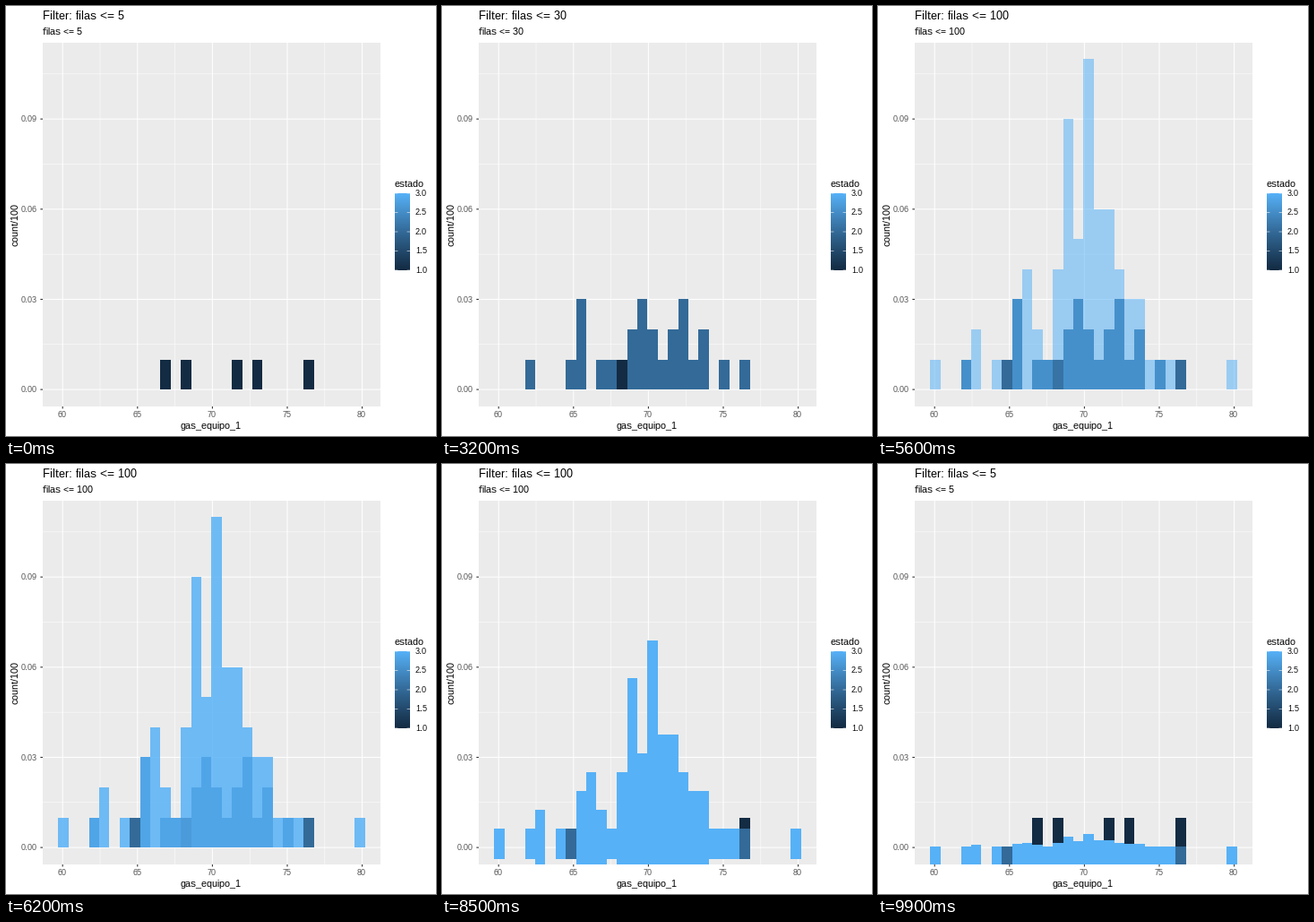
A matplotlib script that plays this animation: 480 by 480 pixels, repeating every 10000 ms.

```python
import numpy as np
import matplotlib.pyplot as plt
from matplotlib.animation import FuncAnimation
from matplotlib.patches import Rectangle

plt.rcParams.update({
    "font.family": "Liberation Sans",
    "text.hinting": "default",
    "text.hinting_factor": 1,
    "toolbar": "None",
})

SIZE, DPI = 480, 72
FRAMES, INTERVAL = 100, 100
LEFT, RIGHT, TOP, BOTTOM = 41, 418, 41, 447
BASE, UNIT = 428.1, 33.55          # zero line, height of one count
BINS, BIN_0, BIN_W = 30, 58.3, 11.41
FADE_2, FADE_3, DRIFT, SPAN = 10, 45, 76, 24
LOW, MID, HIGH = (np.array(c) / 255 for c in
                  ((19, 43, 67), (51, 106, 152), (86, 177, 247)))


def tally(*groups):
    """Histogram of the bin numbers in all groups."""
    return np.bincount(np.concatenate(groups).astype(int), minlength=BINS)


def bell_counts():
    """A bell of readings with some local clusters and strays."""
    b = np.arange(BINS)
    counts = np.rint(6.3 * np.exp(-((b - 15.7) / 3.9) ** 2)).astype(int)
    for spot, extra in ((4, 2), (8, 3), (9, 4), (13, 5), (15, 5)):
        counts[spot] += extra
    return counts + tally((0, 3, 6, 10, 12, 20, 22, 23, 29))


COUNTS = {
    1: tally((10, 12, 17, 19, 24)),
    2: tally((3,), np.setdiff1d(range(7, 25), (9, 12, 21, 23)),
             (13, 15, 17, 20), np.repeat((8, 14, 18), 2)),
    3: bell_counts(),
}


def x_px(v):
    return 230.4 + (v - 70) * 16.72


def y_px(v):
    return BASE - v * 100 * UNIT


def blue(t):
    """Colour scale from LOW through MID to HIGH."""
    t = np.asarray(t)[..., None]
    bend = 4 * t * (1 - t) * (MID - (LOW + HIGH) / 2)
    return LOW + (HIGH - LOW) * t + bend


fig = plt.figure(figsize=(SIZE / DPI, SIZE / DPI), dpi=DPI, facecolor="white")
ax = fig.add_axes([0, 0, 1, 1])
ax.set_axis_off()


def box(x0, y0, x1, y1, color, z):
    return ax.add_patch(Rectangle((x0, y0), x1 - x0, y1 - y0, facecolor=color,
                                  linewidth=0, snap=False, zorder=z))


def line(xs, ys, color, width, z):
    ax.plot(xs, ys, color=color, lw=width, solid_capstyle="butt",
            snap=False, zorder=z)


def label(x, y, s, size, color="black", **kw):
    return ax.text(x, y, s, fontsize=size, color=color, va="baseline", **kw)


# Panel, grid and axes
box(LEFT, TOP, RIGHT, BOTTOM, "#EBEBEB", 0)
for v in np.arange(60, 80.1, 2.5):
    x, major = x_px(v), v % 5 == 0
    line([x, x], [TOP, BOTTOM], "white", 1.07 if major else 0.53, 1 + major)
    if major:
        line([x, x], [BOTTOM, BOTTOM + 2.5], "#333333", 1.07, 1)
        label(x - 0.5, 459, f"{v:.0f}", 8.8, "#4D4D4D", ha="center")
for i in range(8):
    v, major = i * 0.015, i % 2 == 0
    y = y_px(v)
    line([LEFT, RIGHT], [y, y], "white", 1.07 if major else 0.53, 1 + major)
    if major:
        line([LEFT - 2.6, LEFT], [y, y], "#333333", 1.07, 1)
        label(35, y + 3.2, f"{v:.2f}", 8.8, "#4D4D4D", ha="right")

label(229, 472, "gas_equipo_1", 11, ha="center")
label(13, 244, "count/100", 11, ha="center", rotation=90, rotation_mode="anchor")
title = label(41, 15, "", 13.2)
subtitle = label(41, 32, "", 11)

# Legend
LX, LY, LW, LH = 434, 209, 17, 86
label(LX, 202, "estado", 11)
ax.imshow(blue(np.linspace(1, 0, LH))[:, None, :], aspect="auto",
          extent=(LX, LX + LW, LY + LH, LY), interpolation="nearest", zorder=1)
for i in range(5):
    y = LY + LH * i / 4
    for x in (LX, LX + LW * 0.8):
        line([x, x + LW / 5], [y, y], "white", 0.55, 2)
    label(457, y + 2.7, f"{3 - i / 2:.1f}", 8.8)

ax.set_xlim(0, SIZE)
ax.set_ylim(SIZE, 0)


def place(bar, count, drift=0):
    """Set a bar on whole pixels, slid down by a share of its height."""
    top, bottom = (min(round(BASE + UNIT * count * k), BOTTOM)
                   for k in (drift - 1, drift))
    bar.set_y(top)
    bar.set_height(bottom - top)


bars = {}
for state, counts in COUNTS.items():
    bars[state] = []
    for b in np.flatnonzero(counts):
        x0, x1 = (round(BIN_0 + BIN_W * k) for k in (b, b + 1))
        bar = box(x0, 0, x1, 0, blue((state - 1) / 2), 3 + state)
        place(bar, counts[b])
        bars[state].append((bar, counts[b]))


def opacity(state, frame):
    if state == 2:
        if frame < 24:
            return max(0, (frame - FADE_2) / SPAN)
        return min(1, 0.625 + 0.1875 * ((frame - 24) // 4))
    # Seven steps of three frames, the middle one held a little longer
    t = frame - FADE_3 - 2 * (frame > 56)
    return (np.clip(t // 3 + 1, 0, 7) / 7) ** 1.1


def draw(frame):
    limit = 30 if 22 <= frame < 56 else 100 if 56 <= frame < 88 else 5
    title.set_text(f"Filter: filas <= {limit}")
    subtitle.set_text(f"filas <= {limit}")
    drift = max(0, (frame - DRIFT) / SPAN)
    for state in (2, 3):
        alpha = opacity(state, frame)
        for bar, count in bars[state]:
            bar.set_alpha(alpha)
            place(bar, count, drift)
    return []


anim = FuncAnimation(fig, draw, frames=FRAMES, interval=INTERVAL,
                     repeat=True, repeat_delay=0, blit=False)
plt.show()
```
